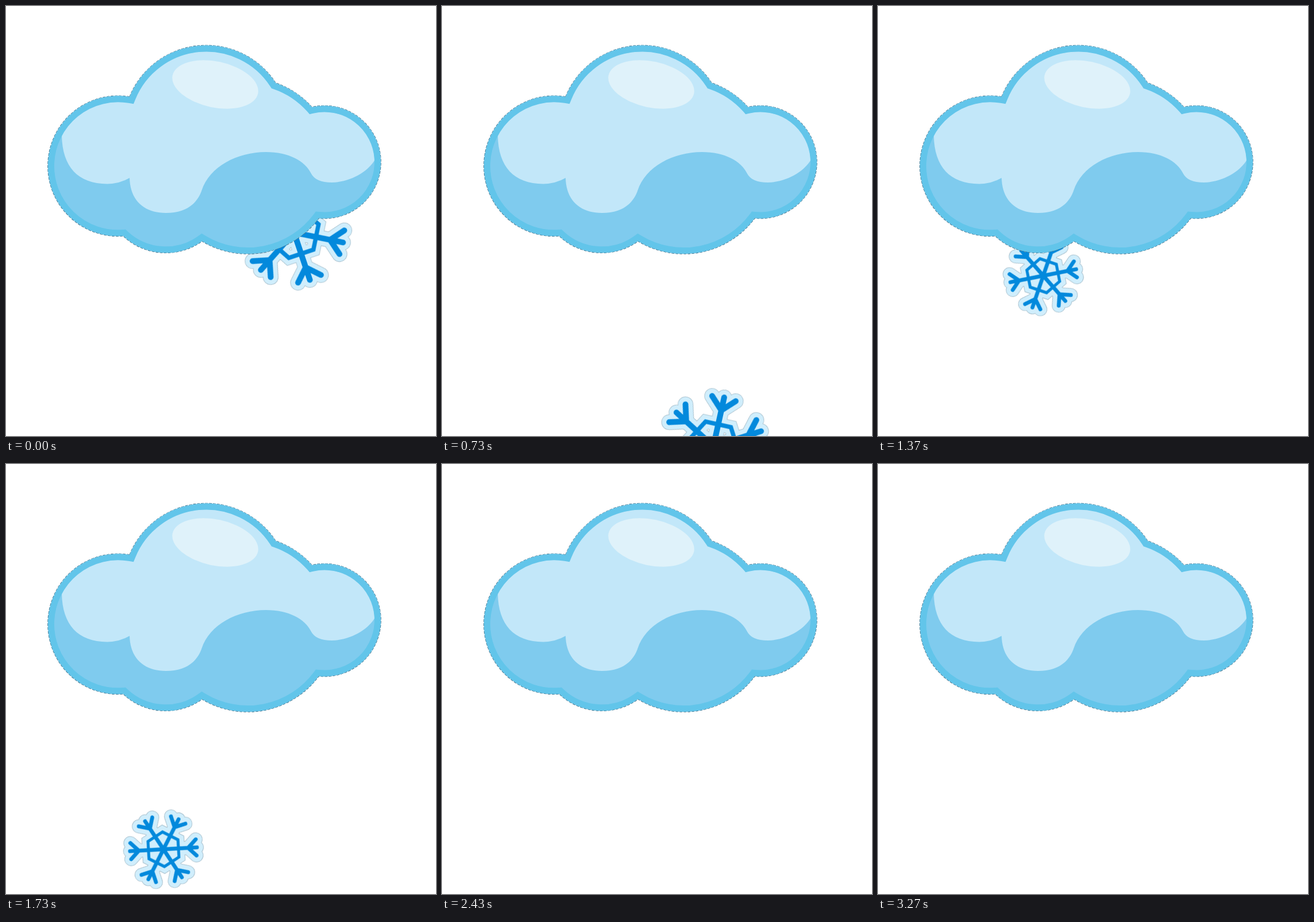
Write an HTML page without scripts that moves like this. It is 748 px wide and 748 px high and loops after 3.31 s.

```html
<!DOCTYPE html>
<html lang="en">
<head>
<meta charset="utf-8">
<title>Snow cloud</title>
<style>
  html, body { margin: 0; width: 100%; height: 100%; overflow: hidden; background: #fff; }
  svg { display: block; width: 748px; height: 748px; }

  /* 99 held poses per loop */
  .flake { animation: 3310ms steps(99) -12ms infinite; }
  .big { --s: 1; animation-name: fall-big; }
  .mid { --s: .67; animation-name: fall-mid; }
  .small { --s: .52; animation-name: fall-small; }

  @keyframes fall-big {
    0% { transform: translate(501px, 394px) rotate(-18.5deg); animation-timing-function: steps(11); }
    11.1111% { transform: translate(491.5px, 580px) rotate(-2.6deg); animation-timing-function: steps(88); }
    100% { transform: translate(336px, 2067px) rotate(118deg); }
  }
  @keyframes fall-mid {
    from { transform: translate(338px, -280px) rotate(-10.7deg); }
    to { transform: translate(216px, 1529px) rotate(60.6deg); }
  }
  @keyframes fall-small {
    from { transform: translate(440px, -1002px) rotate(0deg); }
    to { transform: translate(380px, 839px) rotate(100deg); }
  }

  /* rim keeps its thickness at every flake size */
  .flake use { transform: scale(var(--s)); fill: none; stroke-linecap: round; stroke-linejoin: round; }
  .edge { --w: calc(10px + 17px / var(--s)); stroke: #9db7c5; }
  .rim { --w: calc(10px + 15.4px / var(--s)); stroke: #d0eefc; }
  .ink { --w: 10px; stroke: #0389dc; }
  .arms { stroke-width: var(--w); }
  .hex { stroke-width: calc(var(--w) - 2.5px); stroke-linejoin: miter; }
</style>
</head>
<body>
<svg viewBox="0 0 748 748">
  <defs>
    <path id="arm" d="M0 0V-87M-21-85L0-64 21-85"/>
    <g id="star">
      <g class="arms">
        <path d="M0 0V-87M-21-85L0-64 21-85"/>
        <path d="M0 0V-87M-21-85L0-64 21-85" transform="rotate(60)"/>
        <path d="M0 0V-87M-21-85L0-64 21-85" transform="rotate(120)"/>
        <path d="M0 0V-87M-21-85L0-64 21-85" transform="rotate(180)"/>
        <path d="M0 0V-87M-21-85L0-64 21-85" transform="rotate(240)"/>
        <path d="M0 0V-87M-21-85L0-64 21-85" transform="rotate(300)"/>
      </g>
      <path class="hex" d="M-22.5-39H22.5L45 0 22.5 39H-22.5L-45 0Z"/>
    </g>
    <path id="cloud" d="M215 158A144 144 0 0 1 469 134A150 150 0 0 1 532 176A98 98 0 1 1 544 369A154 154 0 0 1 341 409A108 108 0 0 1 204 400A122 122 0 1 1 215 158Z"/>
    <clipPath id="inside"><use href="#cloud"/></clipPath>
    <clipPath id="below"><path d="M0 300H748V748H0Z"/></clipPath>
  </defs>

  <g clip-path="url(#below)">
    <g class="flake big"><use href="#star" class="edge"/><use href="#star" class="rim"/><use href="#star" class="ink"/></g>
    <g class="flake mid"><use href="#star" class="edge"/><use href="#star" class="rim"/><use href="#star" class="ink"/></g>
    <g class="flake small"><use href="#star" class="edge"/><use href="#star" class="rim"/><use href="#star" class="ink"/></g>
  </g>

  <use href="#cloud" fill="none" stroke="#4c7b93" stroke-width="1.6" stroke-dasharray="5 2"/>
  <g clip-path="url(#inside)">
    <use href="#cloud" fill="#7fcbee"/>
    <path fill="#c2e7f9" d="M97 225C98 280 125 309 176 309.5Q198 309 215 299C216 340 242 360 278 360C313 360 332 344 340 322C353 280 402 254 452 254C492 254 520 270 530 290C536 302 548 307 567 307C600 306 630 288 642 267H660V60H60V225Z"/>
    <ellipse cx="364" cy="136.5" rx="76" ry="40" transform="rotate(12 364 136.5)" fill="#dff2fa"/>
    <use href="#cloud" fill="none" stroke="#62c5ea" stroke-width="22"/>
  </g>
</svg>
</body>
</html>
```
